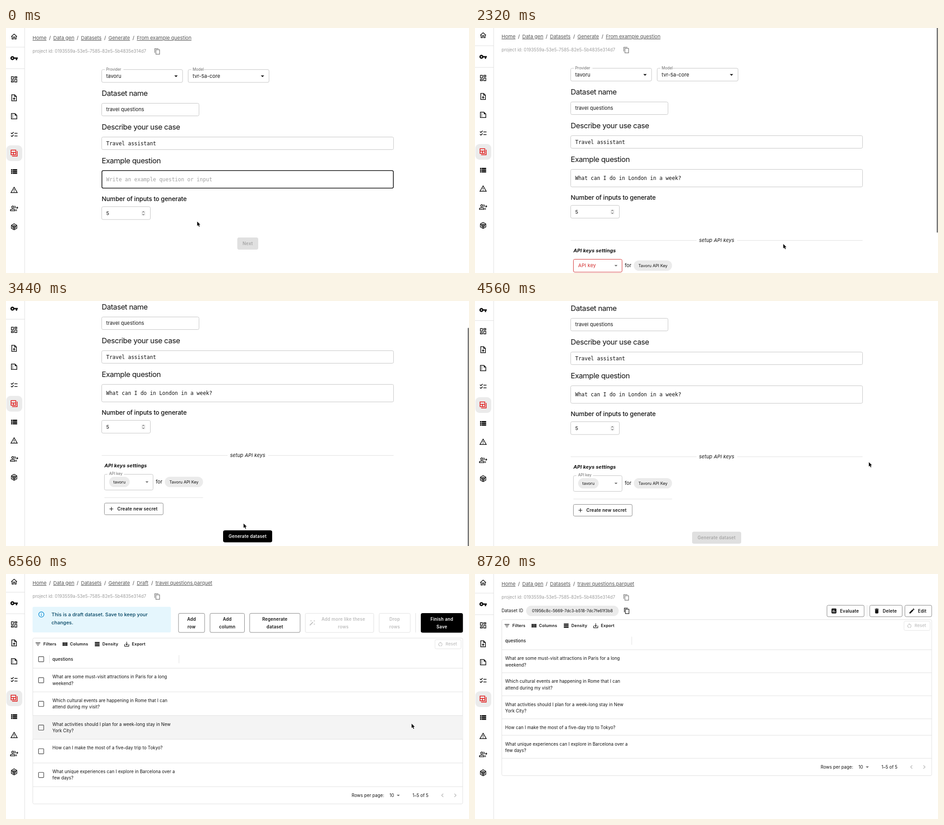
Recreate the animation shown at these times as an HTML page. Size 1028 by 545 pixels, loop 9.44 s.

```html
<!DOCTYPE html>
<html lang="en">
<head>
<meta charset="utf-8">
<title>Generate a dataset</title>
<style>
  html, body { margin: 0; width: 100%; height: 100%; overflow: hidden; background: #fff; }
  svg { display: block; font-family: Inter, "Open Sans", sans-serif; font-optical-sizing: none; }
  .head { letter-spacing: -.027em; }
  .sub { font-weight: 500; letter-spacing: -.011em; }
  .bold { font-weight: 600; letter-spacing: .0286em; }
  .cell { letter-spacing: .01em; }
  .mid { text-anchor: middle; }
  .it { font-style: italic; }
  .mono { font-family: "DejaVu Sans Mono", monospace; }
  .link { text-decoration: underline; text-decoration-thickness: .8px; }
</style>
</head>
<body>
<svg id="stage" width="1028" height="545" viewBox="0 0 1028 545"></svg>
<script>
const LOOP = 9440, STEP = 80;
const stage = document.getElementById('stage');
const QUESTION = 'What can I do in London in a week?';
const ROWS = [
  ['What are some must-visit attractions in Paris for a long', 'weekend?'],
  ['Which cultural events are happening in Rome that I can', 'attend during my visit?'],
  ['What activities should I plan for a week-long stay in New', 'York City?'],
  ['How can I make the most of a five-day trip to Tokyo?'],
  ['What unique experiences can I explore in Barcelona over a', 'few days?']
];

// Icons on a 24 unit grid: [filled path, path stroked 2 units wide]
const ICONS = {
  home: ['', 'M3.5 12 12 4.3l8.5 7.7M6 10v9h4v-6h4v6h4v-9'],
  key: ['M12.65 10a6 6 0 1 0 0 4H17v4h4v-4h2v-4zM7 14a2 2 0 1 1 0-4 2 2 0 0 1 0 4z', ''],
  board: ['', 'M4 4h6v8H4zM14 4h6v4h-6zM14 12h6v8h-6zM4 16h6v4H4z'],
  upload: ['M8 15l1.4 1.4 1.6-1.6V19h2v-4.2l1.6 1.6L16 15l-4-4z', 'M5 3h8.6L19 8.4V21H5zM13.5 3v5.5H19'],
  note: ['M7 7h2v2H7zM7 11h2v2H7zM7 15h2v2H7zM14 4v6h6z', 'M4 4h10.6L20 9.4V20H4z'],
  checks: ['', 'M13 8h9M13 16h9M2.7 6.8l2.8 2.8 5-5M2.7 14.8l2.8 2.8 5-5'],
  tables: ['', 'M3 3h14v14H3zM3 10h14M10 10v7M21 6v15H6'],
  list: ['M3 5h4v4H3zM3 10h4v4H3zM3 15h4v4H3zM8 5h13v4H8zM8 10h13v4H8zM8 15h13v4H8z', ''],
  warn: ['M11 10h2v4h-2zM11 16h2v2h-2z', 'M12 4 21.3 20H2.7z'],
  people: ['M12.5 4a4 4 0 0 1 0 8 6 6 0 0 0 0-8zM16.5 13.8q3.5 1 3.5 3.2v3h-2v-3q0-2-1.5-3.2z',
    'M8 5a3 3 0 1 1 0 6 3 3 0 0 1 0-6zM1 19v-2q1-3 7-3t7 3v2zM21 7v6M18 10h6'],
  cube: ['', 'M12 3l8 4.5v9L12 21l-8-4.5v-9zM12 8l4 2.2v4.3l-4 2.3-4-2.3v-4.3zM8 10.2l4 2.3 4-2.3M12 12.5V21M4 7.5l4 2.7M20 7.5l-4 2.7'],
  copy: ['', 'M3 17V2h13M7 6h13v16H7z'],
  filter: ['M3 6h18v2H3zM6 11h12v2H6zM10 16h4v2h-4z', ''],
  columns: ['M3 5h5v14H3zM9.5 5h5v14h-5zM16 5h5v14h-5z', ''],
  density: ['M3 4h18v4H3zM3 10h18v4H3zM3 16h18v4H3z', ''],
  save: ['M7 11.5l5 5 5-5-1.4-1.4-2.6 2.6V3h-2v9.7l-2.6-2.6z', 'M4 12v8h16v-8'],
  reset: ['M12 2v8L8 6z', 'M12 6a7 7 0 0 1 1 13.9M7 8a7 7 0 0 0 4 11.9'],
  info: ['M11 7h2v2h-2zM11 11h2v6h-2z', 'M12 3a9 9 0 1 1 0 18 9 9 0 0 1 0-18z'],
  wand: ['M2 20 13.7 8.3l2 2L4 22zM5 2l2.5 1.4L10 2 8.6 4.5 10 7 7.5 5.6 5 7l1.4-2.5zM17 2l2.5 1.4L22 2l-1.4 2.5L22 7l-2.5-1.4L17 7l1.4-2.5zM17 14l2.5 1.4L22 14l-1.4 2.5L22 19l-2.5-1.4L17 19l1.4-2.5z',
    'M3 20 14 9'],
  chart: ['M5 3h14l2 2v14l-2 2H5l-2-2V5zM7 10v7h2v-7zM11 7v10h2V7zM15 13v4h2v-4z', ''],
  bin: ['M6 7h12v12l-2 2H8l-2-2zM5 4h3.5l1-1h5l1 1H19v2H5z', ''],
  pen: ['M3 17.2V21h3.8L17.8 9.9l-3.7-3.7zM15.1 5.1l2.6-2.5 3.7 3.7-2.5 2.6z', ''],
  plus: ['', 'M12 5v14M5 12h14'],
  down: ['M7 10l5 5 5-5z', ''],
  prev: ['', 'M14.7 6.7 9.4 12l5.3 5.3'],
  next: ['', 'M9.3 6.7l5.3 5.3-5.3 5.3']
};

const text = (s, x, y, size = 11, cls = 'cell', fill = '#111') =>
  `<text x="${x}" y="${y + size * .36}" font-size="${size}" class="${cls}" fill="${fill}">${s}</text>`;
const rect = (x, y, w, h, fill, stroke = 'none', r = 0, sw = 1) =>
  `<rect x="${x}" y="${y}" width="${w}" height="${h}" rx="${r}" fill="${fill}" stroke="${stroke}" stroke-width="${sw}"/>`;
const line = (x1, y1, x2, y2, color = '#e0e0e0') =>
  `<path d="M${x1} ${y1}L${x2} ${y2}" stroke="${color}"/>`;
const shift = (dy, body) => `<g transform="translate(0 ${dy})">${body}</g>`;
const field = (x, y, w, h) => rect(x, y, w, h, '#fff', '#c4c4c4', 3);

function icon(name, x, y, size, color = '#111') {
  const [solid, lines] = ICONS[name], k = size / 24;
  return `<g transform="translate(${x - size / 2} ${y - size / 2}) scale(${k})">
    <path d="${solid}" fill="${color}" fill-rule="evenodd"/>
    <path d="${lines}" fill="none" stroke="${color}" stroke-width="2"/></g>`;
}

const LOOKS = {
  outline: ['#fff', '#858585', '#111'],
  black: ['#000', '#000', '#fff'],
  off: ['#e0e0e0', '#e0e0e0', '#a6a6a6'],
  ghost: ['#fff', '#e0e0e0', '#bdbdbd']
};
function button(label, x, y, w, h, look, mark, textX = x + w / 2, size = 9.63) {
  const [fill, stroke, ink] = LOOKS[look], lines = label.split('|');
  return rect(x, y, w, h, fill, stroke, 3) +
    (mark ? icon(mark, x + 15.5, y + h / 2, 14.5, ink) : '') +
    lines.map((s, i) => text(s, textX, y + h / 2 + (i - (lines.length - 1) / 2) * 17.2, size, 'bold mid', ink)).join('');
}

const chip = (s, x, y, w) => rect(x, y - 11.5, w, 23, '#ebebeb', 'none', 11.5) + text(s, x + w / 2, y, 9.05, 'mid');

// Smooth value between [time, ...values] keys
function track(t, keys) {
  if (t <= keys[0][0]) return keys[0].slice(1);
  for (let i = 1; i < keys.length; i++) {
    const [a, ...from] = keys[i - 1], [b, ...to] = keys[i];
    if (t <= b) {
      const u = (t - a) / (b - a), e = u * u * (3 - 2 * u);
      return from.map((v, j) => v + (to[j] - v) * e);
    }
  }
  return keys[keys.length - 1].slice(1);
}

const POINTER = [
  [0, 424.5, 430.5], [960, 424.5, 430.5], [1440, 540, 477], [1600, 540, 477], [2160, 684.5, 480.5],
  [2560, 684.5, 480.5], [2800, 290, 404], [2960, 290, 404], [3440, 527.5, 495], [3600, 531, 521],
  [3680, 531, 521], [4080, 874.5, 358.5], [5680, 874.5, 358.5], [6000, 900.5, 324.5], [6480, 900.5, 324.5],
  [6800, 901, 378.5], [7040, 901, 378.5], [7440, 907, 425], [7600, 907, 443], [7760, 907, 443],
  [8240, 972, 112], [8400, 972, 112], [8640, 1014, 62]
];
const FORM_SCROLL = [[2240, 0], [2320, 3], [2640, 123], [3200, 123], [3440, 132], [3680, 129]];
const DRAFT_SCROLL = [[6480, 0], [6560, 2], [6800, 0]];

function sidebar() {
  const names = ['board', 'upload', 'note', 'checks', 'tables', 'list', 'warn', 'people', 'cube'];
  return line(0, 42.5, 41, 42.5) + line(0, 90.5, 41, 90.5) +
    icon('home', 18, 19.2, 18) + icon('key', 18, 67, 18) + rect(1, 261, 35, 35, '#ebebeb', 'none', 9) +
    names.map((n, i) => icon(n, 18, 114.2 + 41 * i, 18, n === 'tables' ? '#e00d0d' : '#111')).join('');
}

function header(extra) {
  const crumbs = [['Home', 59], ['Data gen', 105], ['Datasets', 166.5], ...extra];
  return crumbs.map(([s, x], i) => (i ? text('/', x - 7.5, 22, 11, 'mid', '#444') : '') +
      text(s, x, 22, 11, 'link', '#555')).join('') +
    text('project id: 0193559a-53e5-7585-82e5-5b4835e314d7', 59, 52, 9.63, 'cell', '#9b9b9b') +
    icon('copy', 336, 52, 15, '#757575');
}

function select(label, value, x) {
  return field(x, 92.5, 179.5, 28.5) + rect(x + 7, 91, 6 + label.length * 4.4, 3, '#fff') +
    text(label, x + 10, 92, 8.25, 'cell', '#666') + text(value, x + 10, 107) + icon('down', x + 165, 107, 18);
}

function keySection(chosen, busy) {
  const dy = chosen ? 0 : -6, cy = 534.5 + dy / 2, red = '#d32f2f';
  const box = chosen
    ? field(218.5, 517.5, 108, 35) + rect(225, 516, 37, 3, '#fff') +
      text('API key', 229, 516.5, 8.25, 'cell', '#666') + chip('tavoru', 229, cy, 45.5)
    : rect(218.5, 517.5, 108, 28.5, '#fff', red, 3) + text('API key', 229, cy, 11, 'cell', red);
  return line(212.5, 475.5, 492, 475.5) + line(582, 475.5, 860.5, 475.5) +
    text('setup API keys', 536.5, 475.5, 11, 'cell it mid') +
    `<g font-weight="700">${text('API keys settings', 218.5, 498.5, 11, 'cell it')}</g>` +
    box + icon('down', 313, cy, 16.5, '#666') + text('for', 332.5, cy) + chip('Tavoru API Key', 352.5, cy, 85) +
    shift(dy, line(218.5, 569.5, 437.5, 569.5) +
      button('Create new secret', 218.5, 581.5, 130.5, 26, 'outline', 'plus', 292) +
      button('Generate dataset', 482.5, 642.7, 108, 25.6, chosen && !busy ? 'black' : 'off'));
}

function form(t) {
  const typed = t < 480 ? 0 : Math.min(34, Math.round(34 * (t - 400) / 480));
  const focus = t < 1600, caretX = 222.5 + typed * 6.925;
  return header([['Generate', 227.5], ['From example question', 290.5]]) +
    select('Provider', 'tavoru', 212.5) + select('Model', 'tvr-5a-core', 404.5) +
    text('Dataset name', 212.5, 145, 16.5, 'head') +
    field(212.5, 167.5, 216, 28) + text('travel questions', 222.5, 181.5) +
    text('Describe your use case', 212.5, 220, 16.5, 'head') +
    field(212.5, 242.5, 648, 28) + text('Travel assistant', 222.5, 256.5, 11.5, 'mono') +
    text('Example question', 212.5, 295, 16.5, 'head') +
    (focus ? rect(213, 317.3, 647, 39, '#fff', '#111', 3, 1.6) : field(212.5, 317.5, 648, 39)) +
    (typed ? text(QUESTION.slice(0, typed), 222.5, 337, 11.5, 'mono')
      : text('Write an example question or input', 222.5, 337, 11.5, 'mono', '#a0a0a0')) +
    (focus && t >= 80 ? rect(caretX - .5, 330, 1, 16, '#111') : '') +
    text('Number of inputs to generate', 212.5, 380.5, 13.75, 'sub') +
    field(212.5, 397.5, 108, 28.5) + text('5', 222.5, 412) + rect(300.5, 406, 9, 12, '#f1f1f1', 'none', 2) +
    '<path d="M302.7 410.3l2.3-2.3 2.3 2.3M302.7 413.7l2.3 2.3 2.3-2.3" fill="none" stroke="#333"/>' +
    (t < 1680 ? button('Next', 514, 466.5, 45.5, 26, t < 1040 ? 'off' : 'black') : keySection(t >= 2960, t >= 3680));
}

// Data grid; with checkboxes all rows share one height
function table(top, checks, hover) {
  const x = checks ? 103 : 67, bar = top + 14, headY = top + 47.5, sep = checks ? 384 : 348;
  let y = top + 67.5, body = '';
  const tick = cy => checks ? rect(72.3, cy - 5.7, 11.4, 11.4, 'none', '#5c5c5c', 1, 1.4) : '';
  ROWS.forEach((row, i) => {
    const h = checks ? 52.7 : row.length > 1 ? 51.2 : 36.7;
    body += (i === hover ? rect(59.5, y, 954.5, h, '#f4f4f4') : '') + line(59.5, y, 1014, y) + tick(y + h / 2 + .4) +
      row.map((s, j) => text(s, x, y + 19.3 + 14.4 * j, 9.63)).join('');
    y += h;
  });
  const foot = y + 19.3;
  const tools = [['filter', 71, 'Filters', 83], ['columns', 131, 'Columns', 142],
    ['density', 202.5, 'Density', 214], ['save', 268, 'Export', 279.5]];
  return rect(59.5, top + .5, 954.5, y + 38 - top, '#fff', '#e0e0e0', 3) + body + line(59.5, y, 1014, y) +
    tools.map(([n, ix, s, tx]) => icon(n, ix, bar, 14) + text(s, tx, bar, 9.05, 'bold')).join('') +
    rect(952.5, bar - 10, 58, 20.5, '#fff', '#e4e4e4', 3) + icon('reset', 964.5, bar, 13, '#bdbdbd') +
    `<g font-weight="500">${text('Reset', 976, bar, 9.3, 'cell', '#bdbdbd')}${text('questions', x, headY, 9.63)}</g>` +
    tick(headY) + (checks ? line(96.5, headY - 9, 96.5, headY + 9) : '') + line(sep, headY - 9, sep, headY + 9) +
    text('Rows per page:', 767.5, foot, 9.63) + text('10', 851.5, foot, 9.63) +
    icon('down', 871, foot, 16.5, '#666') + text('1–5 of 5', 902.5, foot, 9.63) +
    icon('prev', 969, foot, 16.5, '#b8b8b8') + icon('next', 997.5, foot, 16.5, '#b8b8b8');
}

function draft(hover) {
  const note = ['This is a draft dataset. Save to keep your', 'changes.'];
  return header([['Generate', 227.5], ['Draft', 290.5], ['travel questions.parquet', 332]]) +
    rect(59, 75, 307, 57, '#e5f6fd', 'none', 3) + icon('info', 78.5, 92, 15.5, '#0288d1') +
    `<g font-weight="500">${note.map((s, i) => text(s, 101, 92.5 + 17.3 * i, 11, '', '#014361')).join('')}</g>` +
    button('Add|row', 383, 89.5, 58, 42.5, 'outline') +
    button('Add|column', 453, 89.5, 76.5, 42.5, 'outline') +
    button('Regenerate|dataset', 541, 89.5, 112, 42.5, 'outline') +
    button('Add more like these|rows', 664.5, 89.5, 152, 42.5, 'ghost', 'wand', 749) +
    button('Drop|rows', 828.5, 89.5, 69, 42.5, 'ghost') + line(909.5, 89, 909.5, 132) +
    button('Finish and|Save', 921.5, 89.5, 92.5, 42.5, 'black') + table(144, true, hover);
}

function saved() {
  return header([['travel questions.parquet', 227.5]]) +
    text('Dataset ID', 59, 82, 9.63) + chip('01956c8c-5669-7dc3-b518-7dc7fe61f3b8', 113.5, 82, 205.5) +
    icon('copy', 337, 82, 14.5) + button('Evaluate', 781.5, 69.5, 82.5, 25.5, 'outline', 'chart', 831.5) +
    line(870.5, 69, 870.5, 95) + button('Delete', 876.5, 69.5, 72, 25.5, 'outline', 'bin', 921) +
    button('Edit', 954.5, 69.5, 59.5, 25.5, 'outline', 'pen', 993) + table(101, false);
}

function scene(t) {
  const [px, py] = track(t, POINTER);
  const isForm = t < 5440;
  const [scroll] = track(t, isForm ? FORM_SCROLL : DRAFT_SCROLL);
  const row = Math.floor((py + scroll - 214.5) / 52.7);
  const page = isForm ? form(t) : t < 8480 ? draft(t >= 5520 ? row : -1) : saved();
  // The sidebar sticks after 47px but follows the overscroll bounce
  const side = Math.min(scroll, 47) + Math.max(0, scroll - 129);
  const bar = t < 2320 || t >= 4560 ? 0 : t < 4480 ? 1 : .5;
  const pointer = (t >= 80 && t < 1040) || t >= 8720 ? '' :
    `<path transform="translate(${px} ${py}) scale(.92)" d="M0 0v10.5l2.4-2.2 1.9 4.2 1.7-.8-1.9-4h3.4z" fill="#000" stroke="#fff" stroke-width=".9" paint-order="stroke"/>`;
  return rect(0, 0, 1028, 545, '#fff') + shift(-scroll, page) +
    line(41.5, 0, 41.5, 545) + shift(-side, sidebar()) +
    `<g opacity="${bar}">${rect(1025, 57 - (129 - scroll) * .8, 3, 499, '#7e7e7e', 'none', 1.5)}</g>` + pointer;
}

let shown = -1;
function tick() {
  const step = Math.floor(performance.now() % LOOP / STEP);
  if (step !== shown) stage.innerHTML = scene((shown = step) * STEP);
  requestAnimationFrame(tick);
}
tick();
</script>
</body>
</html>
```
